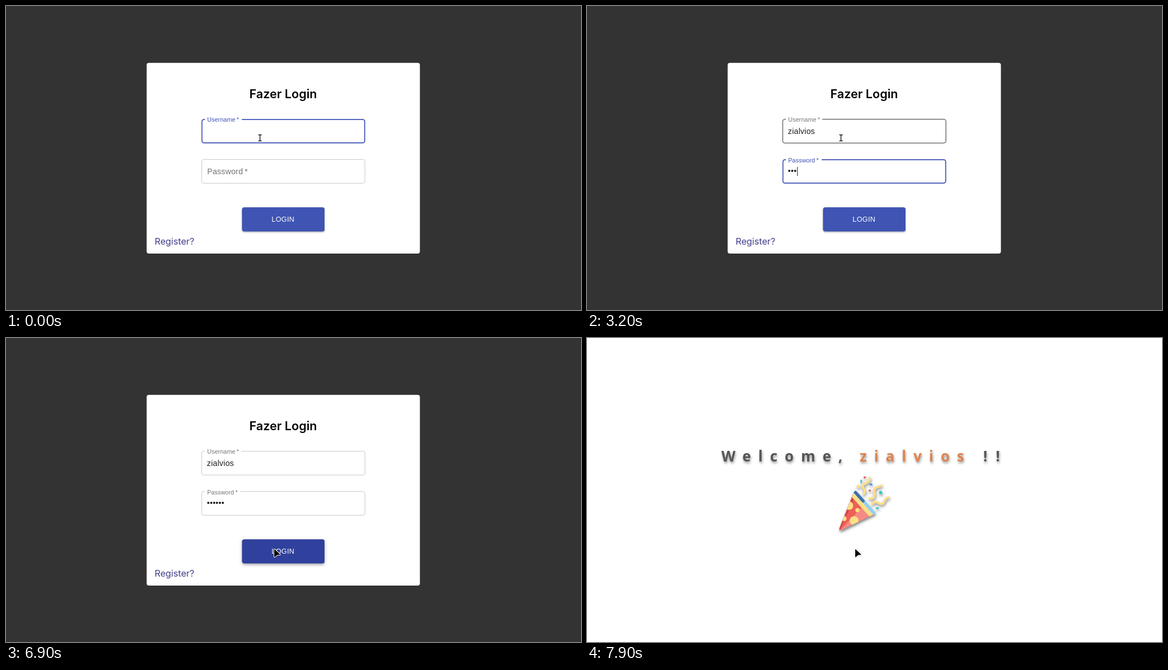
An HTML page with a canvas that plays this animation: 1029 px wide and 544 px high, repeating every 8000 ms.

```html
<!DOCTYPE html>
<html lang="pt">
<head>
<meta charset="utf-8">
<title>Fazer Login</title>
<style>
  html, body { margin: 0; width: 100%; height: 100%; overflow: hidden; background: #333; }
  canvas { display: block; }
</style>
</head>
<body>
<canvas id="stage" width="1029" height="544"></canvas>
<script>
const W = 1029, H = 544, LOOP = 8000, STEP = 100;
const USER = 'zialvios';
const USER_KEYS = [600, 700, 900, 1200, 1300, 1400, 1600, 1700];
const PASS_KEYS = [2600, 3000, 3200, 3500, 3800, 4000];
const TAB = 2032, MOVE = 4680, HOVER = 5080, PRESS = 5316, RELEASE = 5470;
const ARROW = 6900, WELCOME = 6950;
const SANS = '"Liberation Sans", Arial, sans-serif';
const GEOMETRIC = 'Inter, sans-serif';
const BLUE = [63, 81, 181], GREY = [117, 117, 117];

const stage = document.getElementById('stage').getContext('2d');
const clamp = v => Math.min(1, Math.max(0, v));
const lerp = (a, b, k) => a + (b - a) * k;
const mix = (a, b, k) => `rgb(${a.map((v, i) => Math.round(lerp(v, b[i], k)))})`;

function bezier(x1, y1, x2, y2) {
  const at = (a, b, s) => 3 * a * s * (1 - s) ** 2 + 3 * b * s * s * (1 - s) + s ** 3;
  return x => {
    if (x <= 0) return 0;
    if (x >= 1) return 1;
    let lo = 0, hi = 1;
    for (let i = 0; i < 24; i++) {
      const mid = (lo + hi) / 2;
      if (at(x1, x2, mid) < x) lo = mid; else hi = mid;
    }
    return at(y1, y2, lo);
  };
}
const easeOut = bezier(0, 0, 0.2, 1);
const easeInOut = bezier(0.4, 0, 0.2, 1);
const ease = bezier(0.25, 0.1, 0.25, 1);
const progress = (t, start, length, curve) => curve(clamp((t - start) / length));

function makeLayer() {
  const canvas = document.createElement('canvas');
  canvas.width = W;
  canvas.height = H;
  return canvas.getContext('2d');
}

function text(c, str, x, y, font, color, spacing = 0) {
  c.font = font;
  c.letterSpacing = spacing + 'px';
  c.fillStyle = color;
  c.fillText(str, x, y);
  return c.measureText(str).width;
}

function setShadow(c, color, x, y, blur) {
  c.shadowColor = color;
  c.shadowOffsetX = x;
  c.shadowOffsetY = y;
  c.shadowBlur = blur;
}

function roundBox(c, x, y, w, h, r) {
  c.beginPath();
  c.roundRect(x, y, w, h, r);
}

// Outlined box with a gap in its top edge behind the label
function outline(c, y, color, line, gap) {
  c.save();
  if (gap) {
    c.beginPath();
    c.rect(0, 0, W, H);
    c.rect(356, y - 2, gap - 356 + (line > 1 ? 1 : 0), 5);
    c.clip('evenodd');
  }
  c.strokeStyle = color;
  c.lineWidth = line;
  roundBox(c, 349.8 + line / 2, y + line / 2, 293 - line, 43.5 - line, 3.6);
  c.stroke();
  c.restore();
}

function caret(c, x, y) {
  c.fillStyle = '#212121';
  c.fillRect(Math.round(x), y, 1, 16);
}

function drawFields(c, t, overUser) {
  const inPass = t >= TAB, done = t >= PRESS;
  const moved = progress(t, TAB, 200, easeOut);
  const blurred = progress(t, PRESS, 200, easeOut);
  const inputFont = '14.4px ' + SANS;
  const count = keys => keys.filter(k => t >= k).length;
  const blue = `rgb(${BLUE})`;

  outline(c, 202.2, !inPass ? blue : overUser ? '#212121' : '#c4c4c4', inPass ? 0.95 : 1.7, 421);
  text(c, 'Username\u2009*', 360, 207, '10.8px ' + SANS, mix(BLUE, GREY, moved), 0.1);
  const userWidth = text(c, USER.slice(0, count(USER_KEYS)), 359.6, 229, inputFont, '#212121', 0.135);
  if (t >= 200 && !inPass) caret(c, 360 + userWidth, 216);

  const focused = inPass && !done;
  outline(c, 274.2, focused ? blue : '#c4c4c4', focused ? 1.7 : 0.95, t >= TAB + 100 ? 419 : 0);
  const labelColor = done ? mix(BLUE, GREY, blurred) : mix(GREY, BLUE, moved);
  text(c, 'Password\u2009*', 360, lerp(301, 279.5, moved),
    `${lerp(14.4, 10.8, moved)}px ${SANS}`, labelColor, 0.1);
  const passWidth = text(c, '•'.repeat(count(PASS_KEYS)), 359.6, 300, inputFont, '#212121', 0.135);
  const caretOn = t < 4600 || t >= 5100;
  if (focused && caretOn) caret(c, 360 + passWidth, 288);
}

function drawButton(c, t) {
  const hover = progress(t, HOVER, 250, easeInOut);
  const grow = progress(t, PRESS, 550, easeInOut);
  const fade = 1 - progress(t, RELEASE, 530, easeInOut);
  const shape = () => roundBox(c, 422.6, 360.4, 147.4, 42.8, 3.6);
  c.save();
  c.fillStyle = mix([63, 84, 179], [47, 65, 157], hover);
  shape();
  setShadow(c, 'rgba(0,0,0,.26)', 0, lerp(1.6, 2.8, hover), lerp(2.5, 4.5, hover));
  c.fill();
  setShadow(c, 'rgba(0,0,0,.12)', 0, 1, lerp(4.5, 9, hover));
  c.fill();
  setShadow(c, 'transparent', 0, 0, 0);
  text(c, 'LOGIN', 475.3, 386, '12.6px ' + SANS, '#fff', 0.36);
  if (grow > 0 && fade > 0) {
    shape();
    c.clip();
    c.fillStyle = `rgba(255,255,255,${lerp(0.1, 0.3, grow) * fade})`;
    c.beginPath();
    c.arc(481, 381, 66 * grow, 0, Math.PI * 2);
    c.fill();
  }
  c.restore();
}

const cursors = {
  arrow: new Path2D('M0 .8Q0 -.4 1.2 .4L10.2 9Q11 10 9.6 10.1L5.5 10.3L1.2 13.8Q0 14.5 0 13.2Z'),
  hand: new Path2D('M-1.3 1.2Q0 -.8 1.4 1.2V6Q2.8 4.9 3.7 6.2Q5 5.5 5.8 6.9Q7.5 6.6 7.5 8.4V11Q7.4 13.4 6 15.2H-.7Q-2 13.2 -4.7 10.2Q-5.6 8.7 -4.2 8.2Q-3 7.9 -1.3 9.7Z'),
  beam: new Path2D('M-3 -5.5H-1.6Q0 -5.5 0 -4.2V4.2Q0 5.5 -1.6 5.5H-3M3 -5.5H1.6Q0 -5.5 0 -4.2M0 4.2Q0 5.5 1.6 5.5H3')
};

function drawCursor(c, kind, x, y) {
  const path = cursors[kind];
  c.save();
  c.translate(x, y);
  c.lineJoin = 'round';
  c.strokeStyle = '#fff';
  if (kind === 'beam') {
    c.lineWidth = 3;
    c.stroke(path);
    c.strokeStyle = '#111';
    c.lineWidth = 1.4;
    c.stroke(path);
  } else {
    c.lineWidth = 2;
    setShadow(c, 'rgba(0,0,0,.22)', 0, 1, 2);
    c.stroke(path);
    setShadow(c, 'transparent', 0, 0, 0);
    c.fillStyle = '#000';
    c.fill(path);
  }
  c.restore();
}

function drawLogin(c, t) {
  const k = progress(t, MOVE, 580, easeInOut);
  const x = lerp(454.5, 481, k), y = lerp(236, 378, k);
  const overUser = y < 246, overPass = y > 274 && y < 318, overButton = y > 361;

  c.fillStyle = '#333';
  c.fillRect(0, 0, W, H);
  c.fillStyle = '#fff';
  roundBox(c, 251.7, 101.8, 489, 341.3, 4);
  c.fill();
  c.textAlign = 'center';
  text(c, 'Fazer Login', 496, 164.5, '600 21.6px ' + GEOMETRIC, '#000');
  c.textAlign = 'left';
  text(c, 'Register?', 266, 426.5, '16.2px ' + GEOMETRIC, '#413d8b');
  drawFields(c, t, overUser);
  drawButton(c, t);

  if (t >= ARROW) drawCursor(c, 'arrow', 480, 378);
  else drawCursor(c, overButton ? 'hand' : overUser || overPass ? 'beam' : 'arrow', x, y);
}

function drawPopper(c) {
  const fill = (path, color) => { c.fillStyle = color; c.fill(new Path2D(path)); };
  const dot = (x, y, r, color) => {
    c.fillStyle = color;
    c.beginPath();
    c.arc(x, y, r, 0, Math.PI * 2);
    c.fill();
  };
  const line = (path, color, width) => {
    c.strokeStyle = color;
    c.lineWidth = width;
    c.stroke(new Path2D(path));
  };
  const yellow = '#fde085', teal = '#35cdb8', blue = '#4a90d0', red = '#f0605c';

  c.save();
  c.clip(new Path2D('M478 275L514.5 315L456 343.5Q450.5 345.5 452 340Z'));
  fill('M440 350L474 268L520 318Z', '#f58a84');
  fill('M440 350L474 268L498 296L453 344Z', '#ee5f58');
  fill('M440 350L474 268L482 280L453 343Z', '#cf4b45');
  dot(469, 300, 7.5, yellow);
  dot(484, 308, 3.8, yellow);
  dot(478, 327, 8, yellow);
  dot(460, 323, 4.5, yellow);
  line('M474 278L512 320', yellow, 9);
  c.restore();

  c.lineCap = 'round';
  line('M480.5 276.5L513 313', '#8fd0f6', 5.6);
  line('M480.5 276.5L494 291.5', '#3b71ad', 5.6);
  line('M495 279C502 271 490 269 494 263C498 257 505 262 506 250', yellow, 3.6);
  line('M505 287C516 288 515 281 514 275C513 266 520 267 527 264', yellow, 3.6);
  line('M510 297C517 289 520 296 526 297C534 298 530 286 540 285', yellow, 3.6);
  dot(497, 249.5, 2.1, red);
  dot(506, 273, 2, red);
  dot(525.5, 276.5, 2.9, teal);
  dot(485.5, 265.5, 2.8, yellow);
  line('M491 255L490.5 258', teal, 2.8);
  line('M507 262H509.5', blue, 3);
  line('M518 304.5H521', teal, 3);
}

function makeWelcome() {
  const c = makeLayer(), popper = makeLayer();
  const font = 'bold 26px "Noto Sans", sans-serif';
  setShadow(c, 'rgba(0,0,0,.42)', 1, 3, 4);
  text(c, 'Welcome,', 240.5, 221, font, '#555', 13);
  text(c, USER, 488, 221, font, '#dd8550', 13);
  text(c, '!!', 709, 221, font, '#555', 15);
  drawPopper(popper);
  setShadow(c, 'rgba(0,0,0,.5)', 1, 3, 5);
  c.drawImage(popper.canvas, 0, 0);
  return c.canvas;
}
const welcome = makeWelcome();

function drawWelcome(c, t) {
  c.fillStyle = '#fff';
  c.fillRect(0, 0, W, H);
  c.globalAlpha = progress(t, WELCOME, 1000, ease);
  c.drawImage(welcome, 0, 0);
  c.globalAlpha = 1;
  drawCursor(c, 'arrow', 480, 378);
}

const began = performance.now();
function render() {
  const elapsed = (performance.now() - began) % LOOP;
  const t = Math.floor(elapsed / STEP) * STEP;
  if (t >= WELCOME) drawWelcome(stage, t);
  else drawLogin(stage, t);
  requestAnimationFrame(render);
}
render();
</script>
</body>
</html>
```
